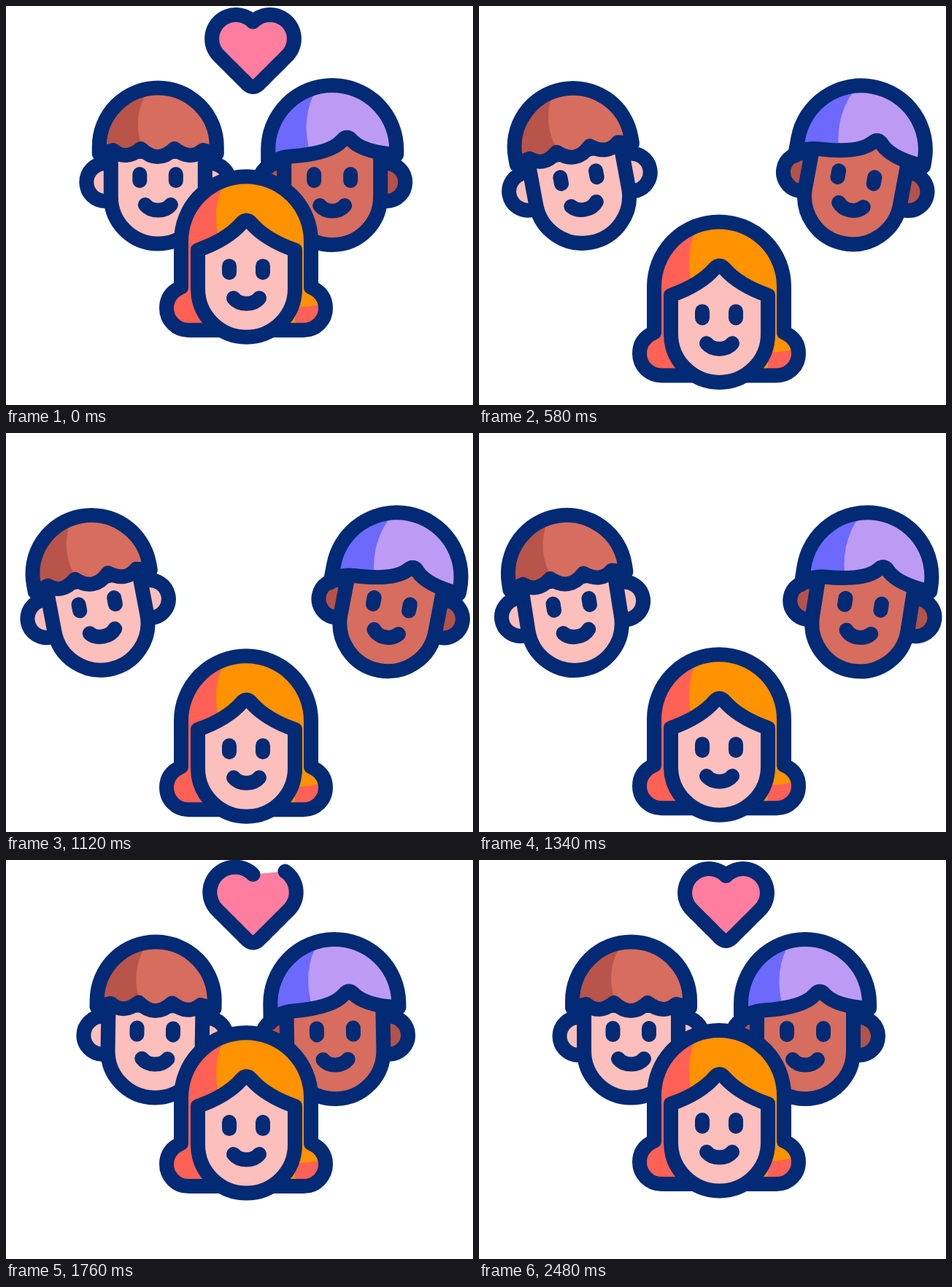
These frames come from a looping animation (640 by 548 pixels, 3600 ms). An HTML page:

```html
<!DOCTYPE html>
<html lang="en">
<head>
<meta charset="utf-8">
<title>Friends</title>
<style>
  html, body { margin: 0; height: 100%; overflow: hidden; background: #fff; }
  svg { display: block; width: 100vw; height: 100vh; }
  .ink { stroke: #022a75; stroke-width: 20; stroke-linecap: round; stroke-linejoin: round; }
  .line { fill: none; }
</style>
</head>
<body>
<svg viewBox="0 0 640 548">
  <defs>
    <path id="boyHair" d="M128 203V193A80.5 80.5 0 0 1 289 193V203L270 198Q253 213 231 196Q208 218 185 196Q164 213 147 198Z"/>
    <path id="manHair" d="M359 222V197A88 88 0 0 1 535 197V204Q490 201 474 185Q467 176 460 185Q444 203 390 206.5Q368 208 359 222Z"/>
    <path id="girlHair" d="M240 323V386Q220 395 220 415A30 30 0 0 0 250 445H408A30 30 0 0 0 438 415Q438 395 418 386V323A89 89 0 0 0 240 323Z"/>
  </defs>
  <g id="boy">
    <g class="ink" fill="#fdbfbb">
      <circle cx="136.5" cy="242" r="26"/>
      <circle cx="280.5" cy="242" r="26"/>
      <path d="M144 200V262A64.5 64.5 0 0 0 273 262V200Z"/>
      <path class="line" d="M183.5 231v9M233 231v9M191 273c8 10 27 10 35 0"/>
    </g>
    <use href="#boyHair" fill="#d66d5f"/>
    <path fill="#b85449" d="M128 203V193A80.5 80.5 0 0 1 196 113Q170 155 189 200L147 198Z"/>
    <use href="#boyHair" class="ink line"/>
  </g>
  <g id="man">
    <g class="ink" fill="#b5524a">
      <circle cx="373" cy="242" r="26"/>
      <circle cx="521" cy="242" r="26"/>
      <path fill="#d66d5f" d="M381 207V262A66 66 0 0 0 513 262V203L467 181Z"/>
      <path class="line" d="M422 231v9M472 231v9M430 274c8 10 26 10 34 0"/>
    </g>
    <use href="#manHair" fill="#bd9bf4"/>
    <path fill="#6c69fc" d="M359 222V197A88 88 0 0 1 427 111Q402 152 417 204L390 206.5Q368 208 359 222Z"/>
    <use href="#manHair" class="ink line"/>
  </g>
  <g id="girl">
    <use href="#girlHair" fill="#ff9200"/>
    <path fill="#ff6154" d="M240 323A89 89 0 0 1 300 239Q282 275 291 320V445H250A30 30 0 0 1 220 415Q220 395 240 386ZM396 413Q418 414 438 407V415A30 30 0 0 1 408 445H396Z"/>
    <use href="#girlHair" class="ink line"/>
    <path class="ink" fill="#fdbfbb" d="M263 388V335Q303 321 323 298Q329.5 290.5 336 298Q356 321 396 335V388A66.5 66.5 0 0 1 263 388Z"/>
    <path class="ink line" d="M306 357v9M352 357v9M312 401c8 10 27 10 35 0"/>
  </g>
  <path id="heart" class="ink" fill="#ff7e9f"/>
</svg>
<script>
const LOOP = 3600;
const $ = id => document.getElementById(id);

const phase = (t, from, to) => Math.min(1, Math.max(0, (t - from) / (to - from)));
const easeOut = (u, power) => 1 - (1 - u) ** power;
const easeInOut = u => u < 0.5 ? 4 * u ** 3 : 1 - 4 * (1 - u) ** 3;
const swing = u => (1 - Math.cos(Math.PI * u)) / 2;
const backOut = u => 1 + 2.7 * (u - 1) ** 3 + 1.7 * (u - 1) ** 2;

// Distance the heads move apart, and how far the two at the back lean.
const spread = t => 72.3 * (easeOut(phase(t, 0, 1200), 3) - easeInOut(phase(t, 1200, 1920)));
const lean = t => 10.8 * easeOut(phase(t, 0, 1000), 4)
  - 13.4 * swing(phase(t, 1150, 1940)) + 2.6 * swing(phase(t, 1940, 2480));

const outline = document.createElementNS("http://www.w3.org/2000/svg", "path");
outline.setAttribute("d", "M338.5 21.8A32 32 0 0 0 291.7 68.3L331 107.6Q338.5 114.5 346 107.6L385.3 68.3A32 32 0 0 0 338.5 21.8Z");
const total = outline.getTotalLength();

// The outline is drawn from the notch; its size changes but its line weight does not.
function heartPath(scale, part) {
  if (part <= 0) return "";
  const steps = 120, points = [];
  for (let i = 0; i <= steps; i++) {
    const p = outline.getPointAtLength(total * part * i / steps);
    points.push((338.5 + (p.x - 338.5) * scale).toFixed(2) + " " + (61.5 + (p.y - 61.5) * scale).toFixed(2));
  }
  return "M" + points.join("L") + (part === 1 ? "Z" : "");
}

function place(id, x, y, angle = 0, cx = 0, cy = 0) {
  $(id).setAttribute("transform", `translate(${x} ${y}) rotate(${angle} ${cx} ${cy})`);
}

function draw(t) {
  const y = spread(t), angle = lean(t), leaving = t < 1000;
  place("boy", -1.2 * y, 0, -angle, 208.5, 218.5);
  place("man", 1.17 * y, 0, angle, 447, 218.5);
  place("girl", 0, y);
  const size = leaving ? 1 - swing(phase(t, 0, 400)) : backOut(phase(t, 1450, 2180));
  const part = leaving ? 1 - phase(t, 0, 360) : phase(t, 1450, 1810);
  $("heart").setAttribute("d", heartPath(size, part));
}

const start = performance.now();
function frame() {
  draw((performance.now() - start) % LOOP);
  requestAnimationFrame(frame);
}
frame();
</script>
</body>
</html>
```
